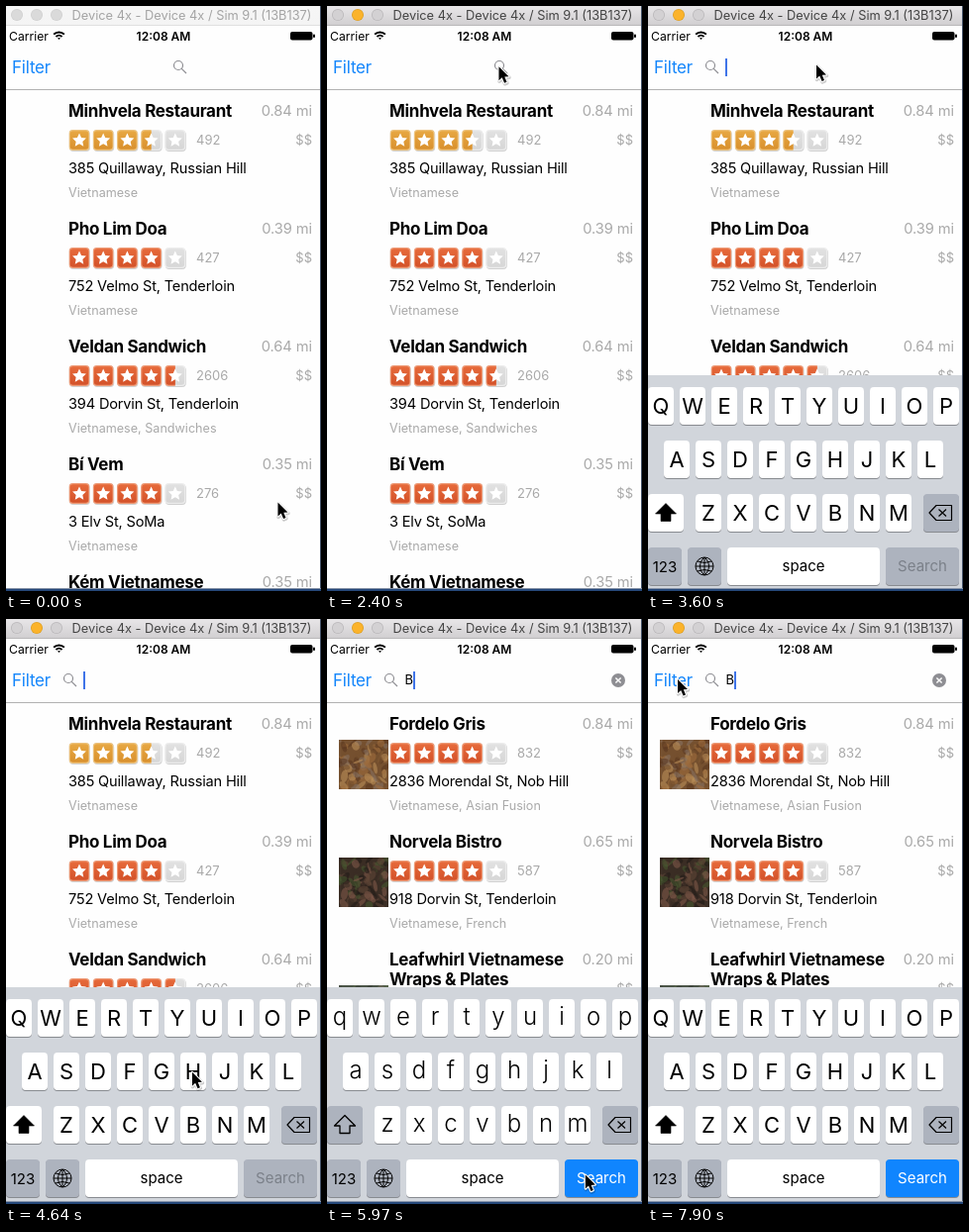
Animation of 318x591 px, one loop 8 s. Source, as an HTML page with a canvas:

```html
<!DOCTYPE html>
<html lang="en">
<head>
<meta charset="utf-8">
<title>Restaurant search</title>
<style>
html, body { margin: 0; width: 100%; height: 100%; overflow: hidden; background: #fff; }
canvas { display: block; }
</style>
</head>
<body>
<canvas id="stage" width="318" height="591"></canvas>
<script>
const ctx = document.getElementById('stage').getContext('2d');
const BLUE = '#1486fb', GREY = '#a9a9a9', KEY_GREY = '#adb3be';

const nearby = [
  { name: ['Minhvela Restaurant'], miles: '0.84', stars: 3.5, votes: 492, address: '385 Quillaway, Russian Hill', kind: 'Vietnamese' },
  { name: ['Pho Lim Doa'], miles: '0.39', stars: 4, votes: 427, address: '752 Velmo St, Tenderloin', kind: 'Vietnamese' },
  { name: ['Veldan Sandwich'], miles: '0.64', stars: 4.5, votes: 2606, address: '394 Dorvin St, Tenderloin', kind: 'Vietnamese, Sandwiches' },
  { name: ['Bí Vem'], miles: '0.35', stars: 4, votes: 276, address: '3 Elv St, SoMa', kind: 'Vietnamese' },
  { name: ['Kém Vietnamese'], miles: '0.35', stars: 4, votes: 310, address: '', kind: '' }
];
const matches = [
  { name: ['Fordelo Gris'], miles: '0.84', stars: 4, votes: 832, address: '2836 Morendal St, Nob Hill', kind: 'Vietnamese, Asian Fusion',
    photo: ['#75502f', '#9c6a3c', '#5a3720', '#b98d58', '#857060'] },
  { name: ['Norvela Bistro'], miles: '0.65', stars: 4, votes: 587, address: '918 Dorvin St, Tenderloin', kind: 'Vietnamese, French',
    photo: ['#3a2d24', '#5d4536', '#46552f', '#7d5648', '#211b18'] },
  { name: ['Leafwhirl Vietnamese', 'Wraps & Plates'], miles: '0.20', stars: 4, votes: 204, address: '', kind: '',
    photo: ['#4b5548', '#77705f', '#5c6a4d', '#8a8173', '#3b4038'] }
];

// [time, values...] with an eased move between neighbouring entries
const cursorPath = [[150, 274.5, 501.5], [1050, 183.5, 66.5], [2100, 183.5, 66.5], [2550, 170, 59.5], [3900, 170, 59.5],
  [4650, 190, 504], [5070, 190, 504], [6120, 265, 565], [6870, 265, 565], [7920, 30, 61]];
const keyboardPath = [[3150, 588], [3300, 506], [3450, 410], [3600, 373], [3750, 372]];
const lensPath = [[3150, 175], [3300, 156], [3450, 95], [3600, 64]];

function follow(path, t) {
  if (t <= path[0][0]) return path[0].slice(1);
  const next = path.findIndex(p => p[0] > t);
  if (next < 0) return path[path.length - 1].slice(1);
  const a = path[next - 1], b = path[next];
  const u = (t - a[0]) / (b[0] - a[0]), e = u * u * (3 - 2 * u);
  return a.slice(1).map((v, i) => v + (b[i + 1] - v) * e);
}

function text(str, x, y, size, { color = '#000', weight = 400, align = 'left', spacing = 0 } = {}) {
  ctx.font = `${weight} ${size}px Inter, "Liberation Sans", sans-serif`;
  ctx.letterSpacing = spacing + 'px';
  ctx.textAlign = align;
  ctx.fillStyle = color;
  ctx.fillText(str, x, y);
}

function rect(x, y, w, h, color, radius = 0) {
  ctx.fillStyle = color;
  ctx.beginPath();
  ctx.roundRect(x, y, w, h, radius);
  ctx.fill();
}

function disc(x, y, r, color) {
  ctx.fillStyle = color;
  ctx.beginPath();
  ctx.arc(x, y, r, 0, 7);
  ctx.fill();
}

function stroke(d, color, width, x = 0, y = 0) {
  ctx.save();
  ctx.translate(x, y);
  ctx.strokeStyle = color;
  ctx.lineWidth = width;
  ctx.stroke(new Path2D(d));
  ctx.restore();
}

function polygon(points, x, y, fill, line, width) {
  ctx.beginPath();
  points.forEach(([px, py]) => ctx.lineTo(x + px, y + py));
  ctx.closePath();
  ctx.lineJoin = 'round';
  if (line) { ctx.strokeStyle = line; ctx.lineWidth = width; ctx.stroke(); }
  if (fill) { ctx.fillStyle = fill; ctx.fill(); }
}

function starShape(x, y) {
  const points = Array.from({ length: 10 }, (_, i) => {
    const r = i % 2 ? 3.5 : 7.3, a = i * Math.PI / 5 - Math.PI / 2;
    return [r * Math.cos(a), r * Math.sin(a)];
  });
  polygon(points, x, y, '#fff');
}

// One rounded tile with a pale bevel, darker towards the bottom
function tile(x, y, [edge, light, dark]) {
  const shade = ctx.createLinearGradient(0, y, 0, y + 21);
  shade.addColorStop(0, light);
  shade.addColorStop(1, dark);
  rect(x, y, 21, 21, edge, 4);
  rect(x + 1.2, y + 1.2, 18.6, 18.6, shade, 3);
}

function rating(value, y) {
  const colors = value < 4 ? ['#edc27c', '#e8a944', '#d88f2c'] : ['#ee9a76', '#e86c3c', '#d25028'];
  for (let i = 0; i < 5; i++) {
    const x = 63.5 + i * 24.2, filled = Math.min(1, Math.max(0, value - i));
    rect(x + 0.5, y + 1, 21, 21, '#d0d0d0', 4);
    tile(x, y, ['#ececec', '#e2e2e2', '#d6d6d6']);
    if (filled) {
      ctx.save();
      ctx.beginPath();
      ctx.rect(x, y, 21 * filled, 21);
      ctx.clip();
      tile(x, y, colors);
      ctx.restore();
    }
    starShape(x + 10.5, y + 10.8);
  }
}

function photo(colors, y) {
  ctx.save();
  ctx.beginPath();
  ctx.rect(12, y, 50, 50);
  ctx.clip();
  rect(12, y, 50, 50, colors[0]);
  ctx.globalAlpha = 0.6;
  let seed = 11;
  const random = () => (seed = seed * 16807 % 2147483647) / 2147483647;
  for (let i = 0; i < 90; i++) {
    ctx.fillStyle = colors[i % colors.length];
    ctx.beginPath();
    ctx.ellipse(12 + random() * 50, y + random() * 50, 2 + random() * 5, 1 + random() * 3, random() * 3, 0, 7);
    ctx.fill();
  }
  ctx.restore();
}

function row(item, index) {
  const y = index * 119, shift = (item.name.length - 1) * 20;
  if (item.photo) photo(item.photo, y + 122 + (shift ? 10 : 0));
  item.name.forEach((line, i) => text(line, 63, y + 112 + i * 20, 17, { weight: 700, spacing: -0.3 }));
  text(item.miles + ' mi', 309, y + 111, 14.7, { color: GREY, align: 'right', spacing: -0.1 });
  text('$$', 309, y + 140, 13, { color: GREY, align: 'right' });
  rating(item.stars, y + 125 + shift);
  text(item.votes, 192, y + 140 + shift, 13, { color: GREY });
  text(item.address, 63, y + 169 + shift, 14.6, { spacing: -0.18 });
  text(item.kind, 63, y + 193 + shift, 12.6, { color: GREY });
}

function titleBar(active) {
  const shade = ctx.createLinearGradient(0, 0, 0, 20);
  shade.addColorStop(0, active ? '#e8e6e8' : '#f6f6f6');
  shade.addColorStop(1, active ? '#d0ced0' : '#f4f4f4');
  rect(0, 0, 318, 20, shade);
  rect(0, 19, 318, 1, active ? '#b9b7b9' : '#e0e0e0');
  const fills = active ? ['#d3d1d3', '#fbb32b', '#d3d1d3'] : ['#dadada', '#dadada', '#dadada'];
  fills.forEach((fill, i) => {
    disc(11 + i * 20, 9, 6, !active ? '#d0d0d0' : i === 1 ? '#dfa023' : '#bab8ba');
    disc(11 + i * 20, 9, 5.2, fill);
  });
  text('Device 4x - Device 4x / Sim 9.1 (13B137)', 187.5, 14, 12.8, { color: active ? '#444' : '#a4a4a4', align: 'center' });
}

function statusBar() {
  text('Carrier', 3, 34.5, 12.2);
  [1, 4.3, 7.6].forEach(r => {
    ctx.beginPath();
    ctx.arc(53.5, 34, r, -Math.PI * 0.75, -Math.PI * 0.25);
    ctx.strokeStyle = '#000';
    ctx.lineWidth = 2;
    ctx.stroke();
  });
  text('12:08 AM', 159, 34.5, 12, { weight: 600, align: 'center' });
  rect(287, 26, 22.5, 8.5, '#000', 2);
  rect(310, 28.5, 2, 3.5, '#000', 1);
}

function searchBar(lensX, query, caret) {
  text('Filter', 6, 68, 17, { color: BLUE, spacing: -0.2 });
  stroke('M3.5 0A4.5 4.5 0 1 1 -5.5 0A4.5 4.5 0 1 1 3.5 0M2.3 3.3L7 8', '#8e8e93', 1.2, lensX, 60);
  if (query) {
    text(query, 78.5, 66, 13);
    disc(294, 62, 7, '#8e8e93');
    stroke('M-2.6 -2.6L2.6 2.6M2.6 -2.6L-2.6 2.6', '#fff', 1.4, 294, 62);
  }
  if (caret) rect(query ? 87 : 78, 53, 2, 18, '#3f74e8');
  rect(0, 84, 318, 1, '#b2b2b2');
}

function key(x, y, w, color = '#fff') {
  rect(x, y + 1, w, 38, '#888b90', 4);
  rect(x, y, w, 38, color, 4);
}

function keyboard(top, upper, canSearch, pressed) {
  rect(0, top, 318, 591 - top, '#d1d5db');
  const rowY = i => top + 12 + i * 54, center = { align: 'center' };
  const letterStyle = { align: 'center', weight: upper ? 400 : 300 };
  [['qwertyuiop', 0], ['asdfghjkl', 16], ['zxcvbnm', 48]].forEach(([letters, left], r) => {
    [...letters].forEach((letter, i) => {
      const x = left + i * 32, y = rowY(r);
      key(x, y, 26);
      text(upper ? letter.toUpperCase() : letter, x + 13, y + (upper ? 27 : 25.5), upper ? 22 : 24, letterStyle);
    });
  });

  const y3 = rowY(2), y4 = rowY(3);
  key(0, y3, 36, upper ? '#fff' : KEY_GREY);
  polygon([[0, -9.5], [10.5, 1], [5, 1], [5, 8.5], [-5, 8.5], [-5, 1], [-10.5, 1]], 18, y3 + 19, upper ? '#000' : null, '#000', upper ? 0.6 : 1.3);
  key(278, y3, 36, KEY_GREY);
  polygon([[-12, 0], [-5, -7.5], [10.5, -7.5], [10.5, 7.5], [-5, 7.5]], 296, y3 + 19, null, '#000', 1.2);
  stroke('M-2.5 -3.5L5 3.5M5 -3.5L-2.5 3.5', '#000', 1.2, 296, y3 + 19);

  key(0, y4, 34, KEY_GREY);
  text('123', 17, y4 + 25, 15, center);
  key(40, y4, 34, KEY_GREY);
  stroke('M9 0A9 9 0 1 1 -9 0A9 9 0 1 1 9 0M0 -9V9M-9 0H9M0 -9C-6 -4 -6 4 0 9C6 4 6 -4 0 -9M-7 -5Q0 -2 7 -5M-7 5Q0 2 7 5', '#000', 1, 57, y4 + 19);
  key(80, y4, 154);
  text('space', 157, y4 + 24, 15, center);
  key(240, y4, 74, canSearch ? '#1085fe' : KEY_GREY);
  text('Search', 277, y4 + 24, 15, { align: 'center', color: canSearch ? '#fff' : '#7b8089' });

  if (pressed) {
    rect(166, y3 - 55, 46, 52, '#fff', 8);
    rect(176, y3 - 10, 26, 48, '#fff', 4);
    text('B', 189, y3 - 17, 34, center);
  }
}

function pointer(x, y) {
  const arrow = [[0, 0], [0, 14], [3.2, 11], [5.6, 16.5], [8, 15.5], [5.8, 10.3], [10, 10]];
  polygon(arrow, x + 0.5, y + 1, null, 'rgba(0,0,0,0.2)', 3.4);
  polygon(arrow, x, y, '#000', '#fff', 2.2);
}

// The screen is refreshed every 150 ms; typing restarts the rhythm
function tick(t) {
  if (t >= 7900) return 7920;
  const start = t < 5070 ? 0 : 5070;
  return start + Math.floor((t - start) / 150) * 150;
}

function draw(t) {
  const typed = t >= 4950, between = (a, b) => t >= a && t < b;
  const caret = t >= 3300 && !between(4050, 4500) && !between(5370, 5820) && !between(7170, 7620);
  const [top] = follow(keyboardPath, t);

  rect(0, 0, 318, 591, '#fefefe');
  (typed ? matches : nearby).forEach(row);
  statusBar();
  searchBar(follow(lensPath, t)[0], typed ? 'B' : '', caret);
  if (top < 588) keyboard(top, !typed || t >= 6270, typed, between(4800, 4950));
  titleBar(t >= 2400);
  rect(317, 0, 1, 588, '#46546a');
  rect(0, 588, 318, 1, '#8794a8');
  rect(0, 589, 318, 2, '#26487a');
  pointer(...follow(cursorPath, t));
}

function loop() {
  draw(tick(performance.now() % 8000));
  requestAnimationFrame(loop);
}
loop();
</script>
</body>
</html>
```
